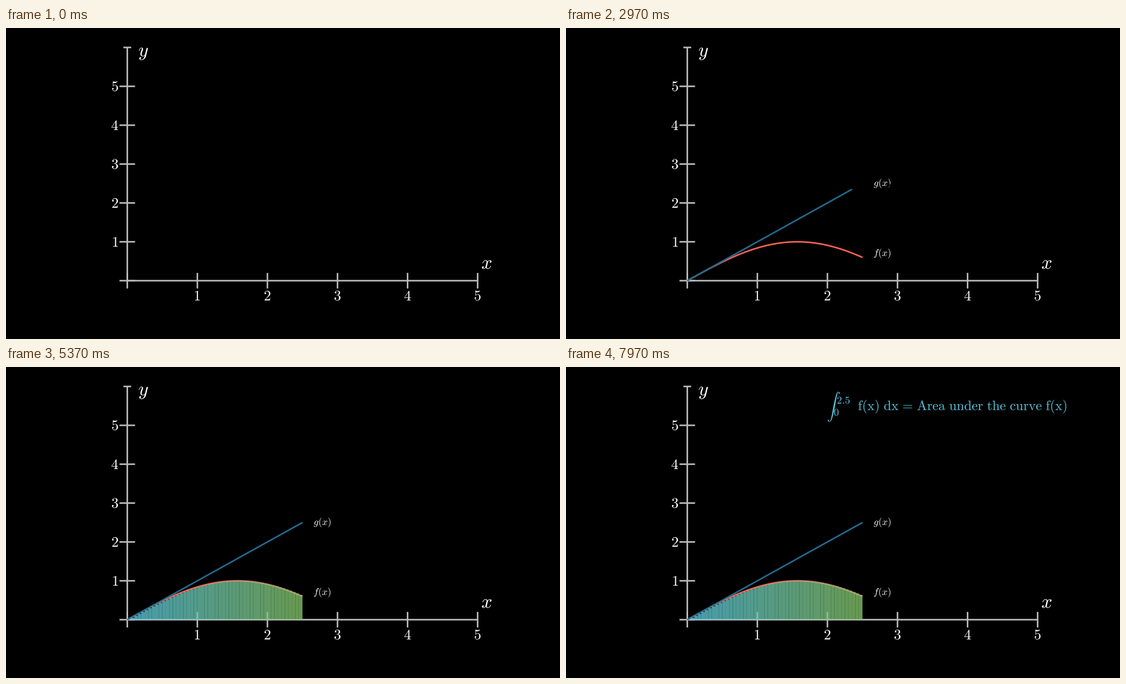
A matplotlib script that plays this animation: 998 px wide and 561 px high, repeating every 8000 ms.

```python
import numpy as np
import matplotlib
import matplotlib.pyplot as plt
from matplotlib.animation import FuncAnimation
from matplotlib.collections import PolyCollection
from matplotlib.patches import PathPatch
from matplotlib.path import Path
from matplotlib.textpath import TextPath

matplotlib.rcParams["mathtext.fontset"] = "cm"
matplotlib.rcParams["path.snap"] = False

W, H, DPI = 998, 561, 64
FPS, LOOP_MS = 30, 8000
FRAMES = FPS * LOOP_MS // 1000

UNIT = H / 8                      # pixels per scene unit
X0, Y0 = W / 2 - 4 * UNIT, H / 2 + 2.5 * UNIT
X_STEP, Y_STEP = 1.8 * UNIT, UNIT
X_END = 2.5
EM = 34.9                         # full-size text, in pixels
STROKE = 0.04 * UNIT * 72 / DPI

GREY, WHITE = "#BBBBBB", "#FFFFFF"
RED, DARK_BLUE = "#FC6255", "#236B8E"
BLUE, GREEN = "#58C4DD", "#83C167"

fig = plt.figure(figsize=(W / DPI, H / DPI), dpi=DPI, facecolor="black")
ax = fig.add_axes([0, 0, 1, 1])
ax.set_xlim(0, W)
ax.set_ylim(H, 0)
ax.axis("off")


def to_px(x, y):
    return X0 + X_STEP * x, Y0 - Y_STEP * y


def smooth(t):
    """Sigmoid easing from 0 to 1."""
    t = min(max(t, 0), 1)
    low = 1 / (1 + np.exp(5))
    return min(max((1 / (1 + np.exp(-10 * (t - 0.5))) - low) / (1 - 2 * low), 0), 1)


def line(x, y, color, z):
    return ax.plot(x, y, color=color, lw=STROKE, zorder=z,
                   solid_capstyle="butt", solid_joinstyle="round")[0]


def inside(a, b):
    return (a.min(0) >= b.min(0)).all() and (a.max(0) <= b.max(0)).all()


def glyphs_of(tex, size, x, y, align=0.5):
    """Outlines per glyph; ink is aligned at x and centred on y."""
    detail = 10
    outline = TextPath((0, 0), f"${tex}$", size=size * detail)
    contours = [np.asarray(p) / detail * (1, -1) for p in outline.to_polygons()]
    points = np.concatenate(contours)
    low, high = points.min(0), points.max(0)
    shift = np.array([x, y]) - low - (high - low) * (align, 0.5)
    glyphs = []
    for c in contours:
        c = c + shift
        if glyphs and (inside(c, glyphs[-1][0]) or inside(glyphs[-1][0], c)):
            glyphs[-1].append(c)
        else:
            glyphs.append([c])
    return glyphs


def cut(glyph, part):
    """The first part of a glyph's outline."""
    left = int(part * sum(map(len, glyph)))
    pieces = []
    for contour in glyph:
        if left >= 3:
            piece = contour[:left]
            pieces.append(np.vstack([piece, piece[:1]]))
        left -= len(contour)
    return pieces


class Label:
    def __init__(self, glyphs, color=WHITE, amount=1):
        self.glyphs = glyphs
        self.patch = ax.add_patch(PathPatch(Path([(0, 0)]), fc=color, ec="none", lw=0, zorder=6))
        self.show(amount)

    def show(self, amount):
        done = amount * len(self.glyphs)
        whole = int(done)
        pieces = [c for g in self.glyphs[:whole] for c in g]
        if whole < len(self.glyphs):
            pieces += cut(self.glyphs[whole], done - whole)
        self.patch.set_visible(bool(pieces))
        if pieces:
            self.patch.set_path(Path.make_compound_path(*[Path(p, closed=True) for p in pieces]))


# Axes
TICK = 0.2 * UNIT
line([X0, X0 + 5 * X_STEP], [Y0, Y0], GREY, 1)
line([X0, X0], [Y0, Y0 - 6 * Y_STEP], GREY, 1)
for i in range(6):
    px, py = to_px(i, i)
    line([px, px], [Y0 - TICK, Y0 + TICK], GREY, 1)
    line([X0 - TICK, X0 + TICK], [py, py], GREY, 1)
    if i:
        Label(glyphs_of(str(i), 0.75 * EM, px, 482.7))
        Label(glyphs_of(str(i), 0.75 * EM, 201.7, py, align=1))
top = Y0 - 6 * Y_STEP
line([X0 - TICK / 2, X0 + TICK / 2], [top, top], GREY, 1)
Label(glyphs_of("y", EM, 247.5, 46.7))
Label(glyphs_of("x", EM, 866, 426.7))

# Curves and their names
f_line = line([], [], RED, 2)
g_line = line([], [], DARK_BLUE, 3)
f_label = Label(glyphs_of("f(x)", EM / 2, 569.6, H / 2 + 1.8 * UNIT))
g_label = Label(glyphs_of("g(x)", EM / 2, 569.6, H / 2))

# Area as thin strips sampled at their left edge
STRIPS = 50
DX = X_END / STRIPS


def strip(i):
    left, y = to_px(i * DX, np.sin(i * DX))
    right = left + X_STEP * DX * 1.001
    return [(left, y), (right, y), (right, Y0), (left, Y0)]


strips = [strip(i) for i in range(STRIPS)]
mix = np.linspace(0, 1, STRIPS)[:, None]
rgb = [np.array(matplotlib.colors.to_rgb(c)) for c in (BLUE, GREEN)]
area = PolyCollection(strips, facecolors=(1 - mix) * rgb[0] + mix * rgb[1],
                      edgecolors="none", linewidths=0, alpha=0.8, zorder=4)
ax.add_collection(area, autolim=False)

# Formula
SIZE = 0.7 * EM
formula = Label(
    glyphs_of(r"\int", SIZE, 471.6, 71.7, align=0)
    + glyphs_of("2.5", 0.77 * SIZE, 499.8, 60)
    + glyphs_of("0", 0.75 * SIZE, 487, 81.7)
    + glyphs_of(r"\mathrm{f(x)\ dx}\hspace{0.133}=\hspace{0.133}"
                r"\mathrm{Area\ under\ the\ curve\ f(x)}", SIZE, 714, 71.5),
    BLUE)


def draw_curve(artist, func, amount):
    x = np.linspace(0, X_END * amount, 120)
    artist.set_data(*to_px(x, func(x)))
    artist.set_visible(amount > 0)


def update(frame):
    t = frame / FPS
    f_part, g_part, area_part, text_part = (smooth(t - s) for s in (0, 2.2, 4.4, 5.4))
    draw_curve(f_line, np.sin, f_part)
    f_label.show(f_part)
    draw_curve(g_line, lambda x: x, g_part)
    g_label.show(g_part)
    shown = round(area_part * STRIPS)
    area.set_verts(strips[:shown])
    area.set_visible(shown > 0)
    formula.show(text_part)
    return []


anim = FuncAnimation(fig, update, frames=FRAMES, interval=LOOP_MS / FRAMES,
                     init_func=lambda: update(0), repeat=True, repeat_delay=0)
plt.show()
```
